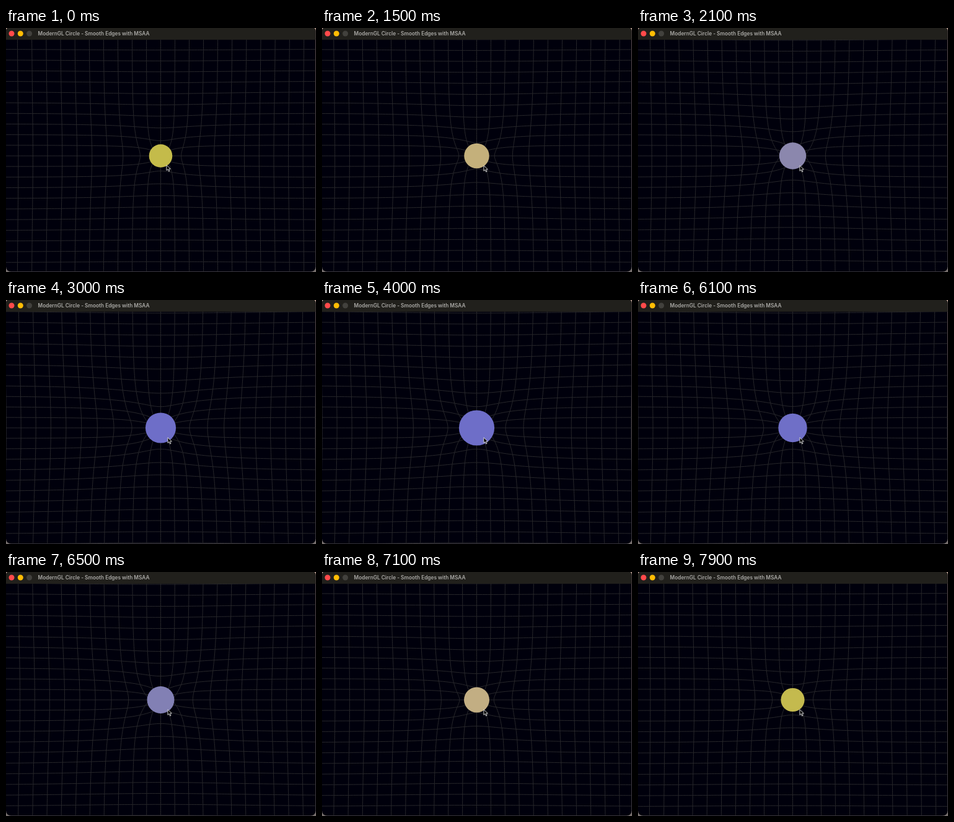
These frames come from a looping animation (500x395 px, 8 s). An HTML page with a canvas:

```html
<!DOCTYPE html>
<html lang="en">
<head>
<meta charset="utf-8">
<title>Circle on a warped grid</title>
<style>
  html, body { margin: 0; width: 100%; height: 100%; overflow: hidden; background: #77706e; }
  canvas { display: block; width: 500px; height: 395px; }
</style>
</head>
<body>
<canvas id="stage" width="500" height="395"></canvas>
<script>
const ctx = document.getElementById('stage').getContext('2d');
const LOOP = 8000, STEP = 100, PEAK = 4.35;
const CX = 249.5, CY = 207, HALF_W = 249.5, HALF_H = 188;
const PITCH_X = 0.0931, PITCH_Y = 0.0922, LINES = 11;
const COLORS = [[196, 187, 74], [196, 175, 130], [132, 130, 178], [110, 110, 200]];

const clamp01 = v => Math.min(1, Math.max(0, v));

// The circle swells toward the peak and shrinks back along the same curve.
const radiusAt = t => 18.8 + 11.4 * clamp01(1 - Math.abs(t - PEAK) / 4) ** 1.65;

// Mass drives both colour and pull; it saturates before the radius peaks.
const massOf = radius => clamp01((radius - 19) / 4.3);
const pullOf = mass => 0.01 + 0.016 * mass ** 1.3;

function colorOf(mass) {
  const pos = mass * (COLORS.length - 1);
  const i = Math.min(Math.floor(pos), COLORS.length - 2);
  const mixed = COLORS[i].map((v, c) => v + (COLORS[i + 1][c] - v) * (pos - i));
  return `rgb(${mixed.join(', ')})`;
}

function disc(x, y, r, fill) {
  ctx.beginPath();
  ctx.arc(x, y, r, 0, 2 * Math.PI);
  ctx.fillStyle = fill;
  ctx.fill();
}

// Each point moves toward the centre by pull / distance.
function warpedPoint(x, y, pull) {
  const scale = Math.max(0, 1 - pull / (x * x + y * y || 1e-6));
  return [CX + x * scale * HALF_W, CY + y * scale * HALF_H];
}

function addCurve(pointAt) {
  for (let i = 0; i <= 120; i++) {
    const [x, y] = pointAt(-1.1 + 2.2 * i / 120);
    i ? ctx.lineTo(x, y) : ctx.moveTo(x, y);
  }
}

function drawGrid(pull) {
  ctx.beginPath();
  for (let k = -LINES; k <= LINES; k++) {
    addCurve(s => warpedPoint(k * PITCH_X, s, pull));
    addCurve(s => warpedPoint(s, k * PITCH_Y, pull));
  }
  ctx.strokeStyle = '#27272a';
  ctx.lineWidth = 1;
  ctx.stroke();
}

function drawCursor(x, y) {
  ctx.save();
  ctx.translate(x, y);
  const arrow = new Path2D('M.3 .3V9L2.4 7.1 3.9 10.6 5.4 9.9 4 6.6 6.8 6.5Z');
  ctx.fillStyle = '#000';
  ctx.fill(arrow);
  ctx.strokeStyle = '#e4e4e4';
  ctx.lineWidth = 0.9;
  ctx.stroke(arrow);
  ctx.restore();
}

function drawTitleBar() {
  ctx.fillStyle = '#21201c';
  ctx.fillRect(0, 0, 500, 19);
  ['#ff4a4b', '#ffbd04', '#42413d'].forEach((fill, i) => disc(9 + 14.3 * i, 9, 4.5, fill));
  ctx.font = '600 8.3px Inter, sans-serif';
  ctx.fillStyle = '#aaa9a6';
  ctx.fillText('ModernGL Circle - Smooth Edges with MSAA', 51.5, 12.3);
}

function drawDesktop() {
  const fade = ctx.createLinearGradient(0, 0, 0, 395);
  fade.addColorStop(0, '#b89c90');
  fade.addColorStop(1, '#77706e');
  ctx.fillStyle = fade;
  ctx.fillRect(0, 0, 500, 395);
}

function draw(ms) {
  const t = Math.floor(ms / STEP) * STEP / 1000;
  const radius = radiusAt(t), mass = massOf(radius);

  drawDesktop();
  ctx.save();
  ctx.beginPath();
  ctx.roundRect(0, -0.5, 499.5, 395, [5, 5, 8, 8]);
  ctx.clip();
  ctx.fillStyle = '#00000c';
  ctx.fillRect(0, 0, 500, 395);
  drawGrid(pullOf(mass));
  disc(CX, CY, radius, colorOf(mass));
  drawTitleBar();
  ctx.restore();

  const arrival = clamp01(t / 0.2);
  drawCursor(258.6 + 2 * arrival, 221.6 + 0.8 * arrival);
}

function tick() {
  draw(performance.now() % LOOP);
  requestAnimationFrame(tick);
}
tick();
</script>
</body>
</html>
```
